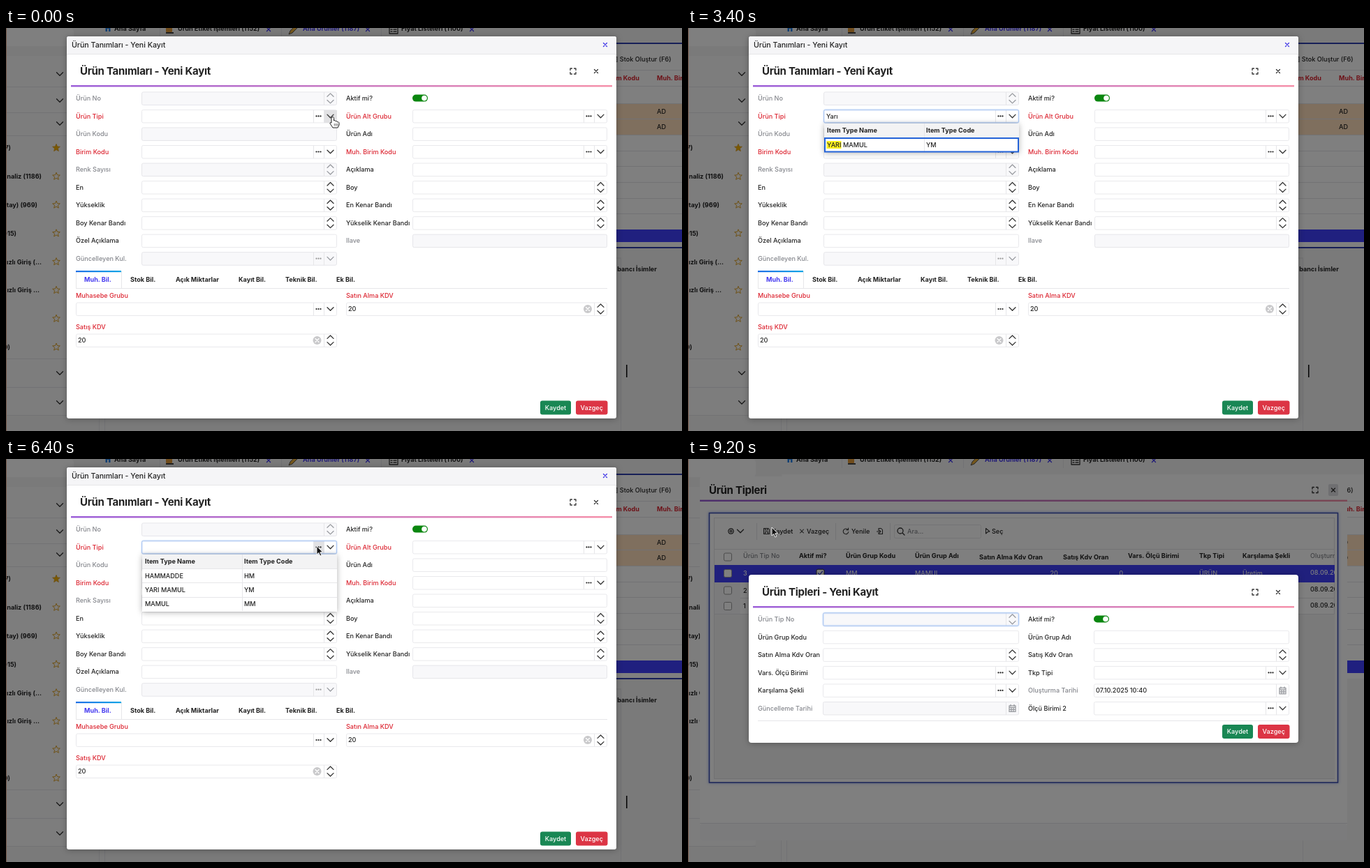
Write an HTML page that moves like this. It is 968 by 578 pixels and loops after 9.4 s.

```html
<!DOCTYPE html>
<html lang="tr">
<head>
<meta charset="utf-8">
<title>Ürün Tanımları</title>
<style>
html, body { margin: 0; width: 100%; height: 100%; overflow: hidden; background: #7d7d7d; }
svg { display: block; width: 968px; height: 578px; }
text { font: 500 9.1px Inter, "Noto Sans", sans-serif; fill: #222; white-space: pre; }
.b { font-weight: 680; }
.red { fill: #dc2430; }
.dim { fill: #84868c; }
.blue { fill: #4338f0; }
.white { fill: #fff; }
.end { text-anchor: end; }
.mid { text-anchor: middle; }
.h { font-size: 15px; font-weight: 700; letter-spacing: -.27px; }
.t { font-size: 10.6px; }
.box { fill: #fff; stroke: #e9e9ec; }
.off { fill: #f8f8fa; stroke: #e6e6ea; }
.ln { fill: none; stroke: #333; stroke-width: 1.3; stroke-linecap: round; stroke-linejoin: round; }
.soft { stroke: #999ba0; }
.rule { fill: none; stroke: #e6e6e9; }
.hover { fill: #e6e6e8; }
.dialog { filter: drop-shadow(0 1px 4px rgba(0,0,0,.3)); }
.focus { fill: none; stroke: #a9c6f3; filter: drop-shadow(0 0 1px #b5cdf5); }
</style>
</head>
<body>
<svg id="stage" viewBox="0 0 968 578"></svg>
<script>
const text = (x, y, s, c = '') => `<text x="${x}" y="${y + 3.3}" class="${c}">${s}</text>`;
const rect = (x, y, w, h, a = '') => `<rect x="${x}" y="${y}" width="${w}" height="${h}" ${a}/>`;
const fill = (x, y, w, h, f, r = 0) => rect(x, y, w, h, `fill="${f}" rx="${r}"`);
const icon = (d, x, y, c = 'ln', a = '') => `<path d="${d}" transform="translate(${x} ${y})" class="${c}" ${a}/>`;
const group = (id, s, a = '') => `<g id="${id}" ${a}>${s}</g>`;
const rule = d => `<path d="${d}" class="rule"/>`;

const P = {
  down: 'M-4.5-2.3L0 2.3L4.5-2.3',
  spin: 'M-4.5-2.6L0-7L4.5-2.6M-4.5 2.6L0 7L4.5 2.6',
  x: 'M-2.5-2.5L2.5 2.5M2.5-2.5L-2.5 2.5',
  full: 'M-4-1.5V-4H-1.5M1.5-4H4V-1.5M4 1.5V4H1.5M-1.5 4H-4V1.5',
  cal: 'M-4.5-3.5H4.5V5H-4.5ZM-4.5-1H4.5M-4.5 2H4.5M-1.5-1V5M1.5-1V5M-2.5-5V-3M2.5-5V-3',
  page: 'M-3-4H1L3-2V4H-3ZM1-4V-2H3',
  edit: 'M0-3H-4V4H3V1M-1.5 1.5L-1-.5L3-4.5L4.5-3L.5 1Z',
  bin: 'M-4-3H4M-1.5-3V-4.5H1.5V-3M-3-3L-2.5 4.5H2.5L3-3M-1-.5V2.5M1-.5V2.5',
  redo: 'M3-2A3.8 3.8 0 1 0 3.8 1M3.5-4.5V-1.8H.8',
  out: 'M-2-1V-4H1.5L3.5-2V4H-2V2M-4.5 .5H1M-1-1.5L1 .5L-1 2.5',
  pick: 'M-2.5-4L3 .5L.2 1L-2.5 3.5Z',
  save: 'M-4-4H2.5L4-2.5V4H-4ZM-2-4V-1.5H1.5V-4M-2 4V1H2V4',
  lens: 'M2 2L5 5M3-1A4 4 0 1 1-5-1A4 4 0 1 1 3-1'
};
const star = [...Array(10)].map((_, i) => {
  const r = i % 2 ? 2.5 : 5.6, a = i * Math.PI / 5;
  return `${i ? 'L' : 'M'}${(r * Math.sin(a)).toFixed(2)} ${(-r * Math.cos(a)).toFixed(2)}`;
}).join('') + 'Z';

const dots = (x, y, c) => [-3, 0, 3].map(d => `<circle cx="${x + d}" cy="${y}" r="1.1" fill="${c}"/>`).join('');

// kind: '' plain, s spinner, d lookup, c calendar
function field(x, r, y, kind = '', off = false, value = '') {
  let s = rect(x + .5, y - 9, r - x - 1, 18.5, `rx="2" class="${off ? 'off' : 'box'}"`);
  if (kind) s += rule(`M${r - 18.5} ${y - 9}v18.5`);
  if (kind == 'd') s += rule(`M${r - 33.5} ${y - 9}v18.5`) + dots(r - 26.5, y, off ? '#999' : '#222');
  const shape = { s: P.spin, d: P.down, c: P.cal }[kind];
  if (shape) s += icon(shape, r - 9.5, y, off || kind == 'c' ? 'ln soft' : 'ln');
  if (value) s += text(x + 3, y, value);
  return s;
}
function clear(x, y) {
  return `<circle cx="${x}" cy="${y}" r="6" fill="#c9c9cb"/>` + icon(P.x, x, y, 'ln', 'style="stroke:#fff"');
}
const toggle = (x, y) => fill(x, y - 5, 22, 10, '#0a860f', 5) + `<circle cx="${x + 17}" cy="${y}" r="3.8" fill="#fff"/>`;
const button = (x, w, y, s, c) => fill(x, y - 10, w, 20, c, 3) + text(x + w / 2, y, s, 'white mid');
const buttons = y => button(765, 44, y, 'Kaydet', '#198754') + button(816, 45.5, y, 'Vazgeç', '#dc3545');
const heading = (x, y, s, x0, x1, ly) => `<text x="${x}" y="${y + 5.4}" class="h">${s}</text>` +
  fill(x0, ly, x1 - x0, 2.4, 'url(#bar)');
const tools = (x, y) => icon(P.full, x, y) + icon(P.x, x + 33, y);

// rows: [left label, kind, right label, kind]; '-' disabled, '*' required, '+' toggle, '=' preset
function form(rows, y0, x0, x1) {
  return rows.map((row, i) => {
    const y = y0 + i * 25.53;
    return [0, 2].map(k => {
      const kind = row[k + 1], off = kind.includes('-'), lx = k ? 487 : 100;
      const c = off ? 'dim' : kind.includes('*') ? 'red' : '';
      if (!row[k]) return '';
      const label = text(lx, y, row[k], kind.includes('=') ? 'dim' : c);
      if (kind.includes('+')) return label + toggle(x1, y - .3);
      return label + field(k ? x1 : x0, k ? 861 : 474, y, kind.replace(/[-*=]/g, ''), off,
        kind.includes('=') ? '07.10.2025 10:40' : '');
    }).join('');
  }).join('');
}

function page() {
  let s = fill(0, 0, 968, 578, '#f5f5f6') + fill(-8, 0, 105, 26, '#fff', 5) + fill(-8, 40, 105, 515, '#fbfbfc', 5);
  s += [84, 121, 154, 474, 515, 555].map(y => rule(`M0 ${y}.5H97`)).join('');
  s += [66, 104, 137, 495, 537].map(y => icon(P.down, 77, y)).join('');
  const side = [[7, '7)'], [51, 'Analiz (1186)'], [45, 'etay) (969)'], [15, '015)'],
    [51, 'Hızlı Giriş (...'], [48, 'Hızlı Giriş ...'], [0, ''], [6, '0)']];
  side.forEach(([x, t], i) => {
    const y = 172 + i * 40.8;
    s += text(x, y, t, 'b end') + icon(star, 72, y, '', `fill="${i ? 'none' : '#f6b400'}" stroke="#e0a52a"`);
  });
  const tabs = [[155, 'Ana Sayfa'], [246, 'Ürün Etiket İşlemleri (1152)', 376],
    [425, 'Ana Ürünler (1187)', 518], [566, 'Fiyat Listeleri (1100)', 667]];
  tabs.forEach(([x, t, cx], i) => {
    s += text(x, 1, t, i == 2 ? 'b blue' : 'b');
    if (cx) s += icon(P.x, cx, 2, 'ln', 'style="stroke:#4338f0"');
  });
  s += rule('M220.5 0V13M394.5 0V13M537.5 0V13');
  s += icon('M-5 0L0-5L5 0H3.5V5H1V1H-1V5H-3.5V0Z', 146, 0, '', 'fill="#2080e8"');
  s += fill(229, -4, 9, 10, '#e29a38', 1) + fill(229, 6, 11, 2, '#444');
  s += icon('M-6 7L-4 2L4-6L7-3L-1 5Z', 411, 2, '', 'fill="#e8ad38" stroke="#555"');
  s += fill(549, -4, 12, 13, '#fff') + icon('M-6-5H6V6H-6ZM-4 0H-2M0 0H4M-4 3H-2M0 3H4', 555, 2);
  s += fill(134.5, 22, 850, 293, '#fff');
  s += text(873, 45, '] Stok Oluştur (F6)') + text(907, 72, 'm Kodu', 'b red end') + text(932, 72, 'Muh. Birim', 'b red');
  s += fill(860, 108, 108, 45, '#ffe0bd') + text(932, 120, 'AD') + text(932, 142, 'AD');
  s += [60, 83, 108, 130, 153, 176, 198, 221, 244, 266].map(y => rule(`M860 ${y}.5H968`)).join('');
  s += fill(860, 289, 108, 18, '#4040ff');
  s += rect(134.5, 22, 850, 293, 'id="pageFrame" fill="none" stroke="#2e3eb0" stroke-width="2"');
  s += rect(133.5, 330, 747, 260, 'class="rule"') + rect(141.5, 330, 739, 260, 'class="rule"');
  s += text(932, 346, 'bancı İsimler', 'b end') + fill(888, 483, 1.6, 18, '#111');
  return s + fill(0, 0, 1, 578, '#e2ac92');
}

function card() {
  let s = fill(87, 12, 787, 548, '#fff', 3) + fill(87, 12, 787, 25, '#f5f5f7', 3) + rule('M87 37.5H874');
  s += text(94, 24.3, 'Ürün Tanımları - Yeni Kayıt', 't') + icon(P.x, 858, 24, 'ln', 'style="stroke:#4038e8"');
  s += heading(106, 62, 'Ürün Tanımları - Yeni Kayıt', 93, 868, 82) + tools(812, 62);
  s += form([
    ['Ürün No', 's-', 'Aktif mi?', '+'],
    ['Ürün Tipi', 'd*', 'Ürün Alt Grubu', 'd*'],
    ['Ürün Kodu', '-', 'Ürün Adı', ''],
    ['Birim Kodu', 'd*', 'Muh. Birim Kodu', 'd*'],
    ['Renk Sayısı', 's-', 'Açıklama', ''],
    ['En', 's', 'Boy', 's'],
    ['Yükseklik', 's', 'En Kenar Bandı', 's'],
    ['Boy Kenar Bandı', 's', 'Yükselik Kenar Bandı', 's'],
    ['Özel Açıklama', '', 'Ilave', '-'],
    ['Güncelleyen Kul.', 'd-', '', '']
  ], 100.9, 194, 582);
  s += rule('M100 373.5H861M100.5 349V373M165.5 349V373') + fill(100, 348, 65, 2.2, 'url(#tab)');
  [[112, 'Muh. Bil.'], [178, 'Stok Bil.'], [243, 'Açık Miktarlar'], [333, 'Kayıt Bil.'],
    [400, 'Teknik Bil.'], [473, 'Ek Bil.']].forEach(([x, t], i) => s += text(x, 361, t, i ? 'b' : 'b blue'));
  s += text(100, 384, 'Muhasebe Grubu', 'red') + field(100, 474, 403, 'd');
  s += text(487, 384, 'Satın Alma KDV', 'red') + field(487, 861, 403, 's', false, '20') + clear(833, 403);
  s += text(100, 429, 'Satış KDV', 'red') + field(100, 474, 448, 's', false, '20') + clear(445.5, 448);
  return s + buttons(544.5);
}

function lookup() {
  const row = (y, a, b, id = '') => `<g id="${id}">${text(199, y, a)}${text(341, y, b)}</g>`;
  const head = fill(195, 137, 279, 20, '#f3f3f4') + text(199, 147, 'Item Type Name', 'b') + text(341, 147, 'Item Type Code', 'b');
  const all = fill(195, 137, 279, 82, '#fff') + head + row(167.5, 'HAMMADDE', 'HM') +
    row(188, 'YARI MAMUL', 'YM') + row(208, 'MAMUL', 'MM') +
    rule('M195 157.5H474M195 177.5H474M195 198.5H474M338.5 137V218');
  const hit = fill(195, 137, 279, 41, '#fff') + head + rule('M338.5 137V178') +
    rect(196, 158, 277, 19.5, 'fill="none" stroke="#2463d8" stroke-width="2"') +
    rect(198.5, 162, 0, 11, 'id="mark" fill="#fff21f"') + row(167.5, 'YARI MAMUL', 'YM', 'found');
  return group('all', all, 'class="dialog"') + group('hit', hit, 'class="dialog"');
}

function typeField() {
  return group('hoverDown', fill(456, 118, 18, 18, '#e2e2e4') + icon(P.down, 464.5, 126.4)) +
    group('hoverDots', fill(441, 118, 14, 18, '#e2e2e4') + dots(447.5, 126.4, '#222')) +
    group('active', rect(194.5, 117.4, 279, 18.5, 'rx="2" class="focus"') +
      '<text id="typed" x="198" y="129.7"></text>' + rect(198, 121, 1, 11, 'id="caret" fill="#111"'));
}

function check(x, y, on) {
  return rect(x - 5.5, y - 5.5, 11, 11, `rx="2" fill="#fff" stroke="${on ? '#333' : '#999'}"`) +
    (on ? icon('M-3 0L-1 2.5L3-2.5', x, y, 'ln', 'style="stroke:#3038c8"') : '');
}
const tool = (p, x, s, tx) => icon(p, x, 102.5, 'ln', 'style="stroke-width:1.05"') + text(tx, 102.5, s);
const sep = x => rule(`M${x}.5 91V115`);

function list() {
  let s = fill(17, 25, 927, 522, '#fff', 4) + fill(17, 523, 927, 24, '#f7f7f9', 4) + rule('M17 522.5H944');
  s += fill(917, 36, 14, 17, '#e0e0e3', 2) + heading(30, 45, 'Ürün Tipleri', 17, 944, 58.6);
  s += icon(P.full, 898, 44.5) + icon(P.x, 924, 44.5);
  s += group('frame', rect(30.5, 77.5, 900, 386.5, 'fill="#fff" stroke="#3e50b4" stroke-width="1.6"'),
    'style="filter:drop-shadow(0 0 2px #9fb0f0)"');
  let g = rect(36.5, 83.5, 888, 374, 'fill="#fff" stroke="#e4e4e7"') + fill(37, 221, 888, 236, '#f5f5f6');
  g += rule('M37 128.5H925M37 198.5H925M37 221.5H925') + fill(37, 176, 37, 45, '#f8f8f9');
  g += rect(46, 90, 45, 25, 'id="gearBg" class="hover" rx="2"');
  g += `<circle cx="60.5" cy="102.5" r="3.7" class="ln" stroke-dasharray="2.3 .6"/><circle cx="60.5" cy="102.5" r="1.4" class="ln"/>`;
  g += icon(P.down, 74, 102.5) + sep(97);
  g += group('browse', rect(103, 90, 36, 25, 'id="newBg" class="hover" rx="2"') +
    tool(P.page, 110.5, 'Yeni', 117.5) + tool(P.edit, 150, 'Düzenle', 158) + tool(P.bin, 207.5, 'Sil', 215));
  g += group('editing', rect(104, 90, 48, 25, 'id="saveBg" class="hover" rx="2"') +
    tool(P.save, 111.5, 'Kaydet', 119) + tool(P.x, 162, 'Vazgeç', 169));
  g += group('tail', sep(235) + tool(P.redo, 250, 'Yenile', 258) + tool(P.out, 299, '', 0) + sep(313) +
    rect(319.5, 93.5, 124, 19, 'rx="2" class="box"') + icon(P.lens, 329, 103) +
    text(338, 102.8, 'Ara...', 'dim') + tool(P.pick, 453, 'Seç', 459));
  g += check(56, 139.5);
  [[78, 'Ürün Tip No', 0], [158, 'Aktif mi?', 0], [225, 'Ürün Grup Kodu', 0], [324, 'Ürün Grup Adı', 0],
    [416, 'Satın Alma Kdv Oran', 1.5], [536, 'Satış Kdv Oran', 1.5], [629, 'Vars. Ölçü Birimi', 0],
    [731, 'Tkp Tipi', 0], [793, 'Karşılama Şekli', 0], [890, 'Oluşturma Tarihi', 0]
  ].forEach(([x, t, d], i) => g += text(x, 138 + d, t, i % 9 ? 'b' : 'dim'));
  g += fill(37, 151, 888, 25, '#4040fb');
  [[163, 3, 'MM', 'MAMUL', 0, 'Üretim'], [187.5, 2, 'YM', 'YARI MAMUL', 20, 'Üretim'],
    [210, 1, 'HM', 'HAMMADDE', 20, 'Satın Alma']].forEach(([y, no, code, name, vat, way], i) => {
    const c = i ? '' : 'white ';
    g += check(56, y) + check(188.5, y - .3, true) + text(78, y, no, c) + text(225, y, code, c) + text(324, y, name, c) +
      text(529, y, 20, c + 'end') + text(622, y, vat, c + 'end') + text(731, y, 'ÜRÜN', c) +
      text(793, y, way, c) + text(890, y - 1.5, '08.09.2025', c);
  });
  return s + group('grid', g, 'clip-path="url(#cut)"');
}

function record() {
  let s = fill(87, 166, 787, 241, '#fff', 4) + heading(106, 191, 'Ürün Tipleri - Yeni Kayıt', 93, 868, 211) + tools(812, 191);
  s += form([
    ['Ürün Tip No', 's-', 'Aktif mi?', '+'],
    ['Ürün Grup Kodu', '', 'Ürün Grup Adı', ''],
    ['Satın Alma Kdv Oran', 's', 'Satış Kdv Oran', 's'],
    ['Vars. Ölçü Birimi', 'd', 'Tkp Tipi', 'd'],
    ['Karşılama Şekli', 'd', 'Oluşturma Tarihi', 'c='],
    ['Güncelleme Tarihi', 'c-', 'Ölçü Birimi 2', 'd']
  ], 229.8, 193, 581);
  return s + rect(193.5, 220.8, 280, 18.5, 'rx="2" class="focus"') + rule('M100 375.5H861') + buttons(391);
}

const cursors = group('hand', '<path d="M-1 0C.5-1 1.5 0 1.5 1.5V5C3 4 4 5 4 6C5 5 6.5 5.5 6.5 7C8 6.5 9 7 9 8.5V11L7 15H0L-4 9C-4.5 7.5-3 7-2 8.2V1Z" fill="#fff" stroke="#222"/><path d="M2.3 9V12.5M4.6 9V12.5M6.8 9V12.5" stroke="#222" stroke-width=".7"/>') +
  group('arrow', '<path d="M0 0V12L2.8 9.4L4.8 14L6.8 13.1L4.8 8.7H8.5Z" fill="#111" stroke="#fff" stroke-width=".9"/>') +
  group('beam', '<path d="M-3-7Q0-7 0-5Q0-7 3-7M0-5V6M-3 7Q0 7 0 5Q0 7 3 7M-1.5 1H1.5" fill="none" stroke="#222" stroke-width="1.2"/>');

const gradient = (id, a, b) => `<linearGradient id="${id}"><stop stop-color="${a}"/><stop offset="1" stop-color="${b}"/></linearGradient>`;
const shade = id => rect(0, 0, 968, 578, `id="${id}" fill="#000" opacity=".5"`);
const stage = document.getElementById('stage');
stage.innerHTML = `<defs>${gradient('bar', '#9a5cd8', '#f58fa9')}${gradient('tab', '#1f6fe6', '#12a5e6')}
  <clipPath id="cut"><rect x="36" y="83" width="889" height="376"/></clipPath></defs>` +
  page() + shade('low') + group('card', group('', card(), 'class="dialog"') + typeField() + lookup()) +
  group('list', list(), 'class="dialog"') + shade('high') + group('record', record(), 'class="dialog"') + group('cursor', cursors);

const el = {};
stage.querySelectorAll('[id]').forEach(n => el[n.id] = n);
const show = (id, on) => el[id].style.display = on ? '' : 'none';

const path = [[0, 468, 128], [1000, 468, 128], [1600, 333, 130], [5000, 333, 130], [5800, 445, 125],
  [6800, 445, 125], [7400, 55, 113], [8200, 120, 98], [9400, 120, 98]];
function pointer(t) {
  const i = path.findIndex(p => p[0] > t), [t0, x0, y0] = path[i - 1], [t1, x1, y1] = path[i];
  const u = (t - t0) / (t1 - t0), e = u * u * (3 - 2 * u);
  return [x0 + (x1 - x0) * e, y0 + (y1 - y0) * e];
}

function draw(t) {
  const listed = t >= 6600, editing = t >= 8800, fresh = t >= 9200, open = t >= 800;
  const [x, y] = pointer(t);
  const count = t < 4000 ? Math.min(4, Math.max(0, t / 200 - 10)) : Math.max(0, 23 - t / 200);

  show('card', !listed);
  show('list', listed);
  show('low', !fresh);
  show('high', fresh);
  show('record', fresh);
  show('pageFrame', !editing);
  el.list.classList.toggle('dialog', !fresh);

  show('active', open);
  show('all', open && !count);
  show('hit', count > 0);
  show('hoverDown', x > 456);
  show('hoverDots', x > 441 && x <= 456);
  el.typed.textContent = 'Yarı'.slice(0, count);
  if (count) el.mark.setAttribute('width', el.found.firstChild.getSubStringLength(0, count) + .5);
  el.caret.setAttribute('x', count ? 198.5 + el.typed.getComputedTextLength() : 198);
  show('caret', Math.floor((t + 150) / 500) % 2 == 0);

  const overGear = listed && x > 46 && x < 91 && y > 90 && y < 115;
  show('frame', editing);
  show('browse', !editing);
  show('editing', editing);
  show('gearBg', overGear);
  show('newBg', x > 103 && x < 139 && y < 115);
  show('saveBg', !fresh);
  el.grid.setAttribute('transform', editing ? 'translate(1 1)' : '');
  el.tail.setAttribute('transform', editing ? 'translate(-25 0)' : '');

  const kind = listed ? (overGear ? 'hand' : 'arrow') : x > 456 ? 'hand' : x > 441 ? 'arrow' : 'beam';
  ['hand', 'arrow', 'beam'].forEach(k => show(k, k == kind));
  show('cursor', t < 2200 || t > 4800);
  el.cursor.setAttribute('transform', `translate(${x} ${y})`);
}

// the picture advances in 200 ms steps
function tick() {
  draw(Math.floor(performance.now() % 9400 / 200) * 200);
  requestAnimationFrame(tick);
}
tick();
</script>
</body>
</html>
```
